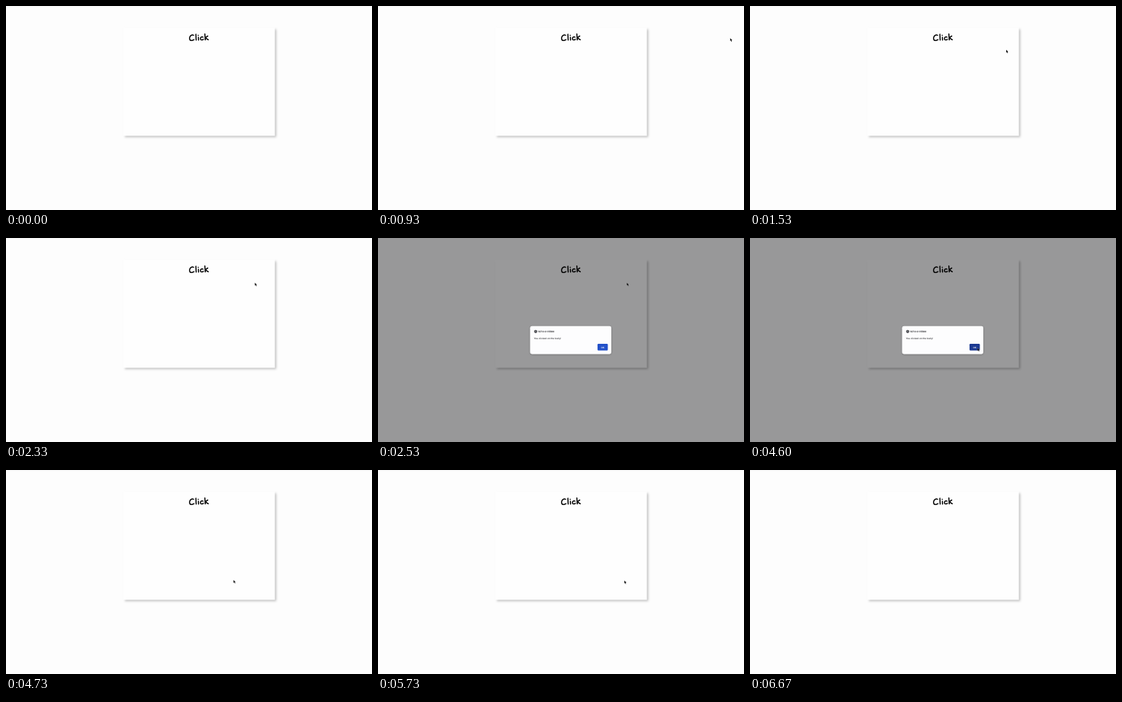
An HTML page that plays this animation: 480 by 268 pixels, repeating every 7.59 s.

```html
<!DOCTYPE html>
<html lang="en">
<head>
<meta charset="utf-8">
<title>Click</title>
<style>
  html, body { margin: 0; width: 100%; height: 100%; overflow: hidden; background: #fdfdfd; }
  svg { display: block; width: 100%; height: 100%; }
  text { font-family: Inter, Roboto, sans-serif; text-rendering: geometricPrecision; }
</style>
</head>
<body>
<svg viewBox="0 0 480 268">
  <defs>
    <filter id="shadow" x="-10%" y="-10%" width="120%" height="120%">
      <feDropShadow dx="2" dy="2" stdDeviation="1.7" flood-color="#000" flood-opacity=".25"/>
    </filter>
    <filter id="lift" x="-10%" y="-20%" width="120%" height="150%">
      <feDropShadow dx="0" dy=".6" stdDeviation=".9" flood-color="#000" flood-opacity=".3"/>
    </filter>
  </defs>

  <rect width="480" height="268" fill="#fdfdfd"/>
  <rect width="480" height="1.5" fill="#f8f8f8"/>
  <rect x="154" y="28.5" width="198.3" height="141.7" fill="#fefefe" filter="url(#shadow)"/>

  <rect id="dim" width="480" height="268" fill="#000004" opacity=".4"/>

  <!-- handwritten heading -->
  <g role="img" aria-label="Click" fill="none" stroke="#000" stroke-width="1.45" stroke-linecap="round" stroke-linejoin="round">
    <path d="M246 38.5C244 36.8 240.9 39.4 240.7 42.2C240.5 45.4 243.6 46.3 246.5 44.2"/>
    <path d="M249 37.1L249.4 44.7"/>
    <path d="M252.3 41.1L252.5 44.7M252.1 38.4L252.2 38.5"/>
    <path d="M258.3 41C256.8 39.9 255 41.3 255 42.9C255 44.8 257 45.1 258.8 43.8"/>
    <path d="M260.8 36.7L261.3 44.5M264.6 39.4L261.4 41.8L265.3 44.3"/>
  </g>

  <g id="dialog">
    <rect x="199.5" y="115.8" width="106.5" height="36.7" rx="2.4" fill="#fdfdfe" filter="url(#lift)"/>
    <circle cx="206.8" cy="122.8" r="2.1" fill="#4a4b50"/>
    <path d="M205.6 122.3h1.3v1.3M207.2 121.5l.8 .9" fill="none" stroke="#b4b5b8" stroke-width=".45"/>
    <text x="210" y="123.9" font-size="3.05" font-weight="700" fill="#26272a">127.0.0.1:5500</text>
    <text x="204.4" y="133.3" font-size="3.05" font-weight="500" fill="#2c2d30">You clicked on the body!</text>
    <rect id="button" x="287.9" y="139.1" width="13.5" height="8.6" rx="1.2"/>
    <text x="294.6" y="144.5" font-size="3" font-weight="600" fill="#fff" text-anchor="middle">OK</text>
  </g>

  <path id="cursor" d="M0 0V3.8L.9 3L1.6 4.6L2.3 4.3L1.6 2.8H2.8Z" fill="#111" stroke="#fff" stroke-width=".35" stroke-opacity=".7" paint-order="stroke"/>
</svg>
<script>
const LOOP = 7590, TICK = 1000 / 15;
const [dim, dialog, button, cursor] =
  ['dim', 'dialog', 'button', 'cursor'].map(id => document.getElementById(id));

const easeOut = p => 1 - (1 - p) ** 2;
const easeIn = p => p ** 1.6;
const smooth = p => p * p * (3 - 2 * p);

// start, end, from, to, easing
const moves = [
  [933, 1533, [462, 42.3], [336, 57.4], easeOut],
  [1667, 1733, [336, 57.4], [335.3, 57.5], smooth],
  [2133, 2333, [335.3, 57.5], [326.4, 58.8], smooth],
  [3267, 4000, [326.4, 58.8], [298.6, 147], smooth],
  [4133, 4267, [298.6, 147], [298.4, 144.5], smooth],
  [5600, 6067, [298.4, 144.5], [482, 150], easeIn]
];

function cursorAt(t) {
  let at = moves[0][2];
  for (const [start, end, from, to, ease] of moves) {
    if (t < start) break;
    const p = ease(Math.min(1, (t - start) / (end - start)));
    at = from.map((v, i) => v + (to[i] - v) * p);
  }
  return at;
}

const show = (el, on) => el.setAttribute('visibility', on ? 'visible' : 'hidden');

function draw(time) {
  const t = Math.floor((time % LOOP + 4) / TICK) * TICK;
  const [x, y] = cursorAt(t);
  const open = t >= 2530 && t < 4730;
  const hover = x < 301 && y > 139;
  show(dim, open);
  show(dialog, open);
  show(cursor, t >= 930 && t < 6060);
  button.setAttribute('fill', t >= 4595 ? '#1c3a92' : hover ? '#2149b4' : '#2351c9');
  cursor.setAttribute('transform', `translate(${x.toFixed(2)} ${y.toFixed(2)})`);
}

const begin = performance.now();
function loop() {
  draw(performance.now() - begin);
  requestAnimationFrame(loop);
}
loop();
</script>
</body>
</html>
```
